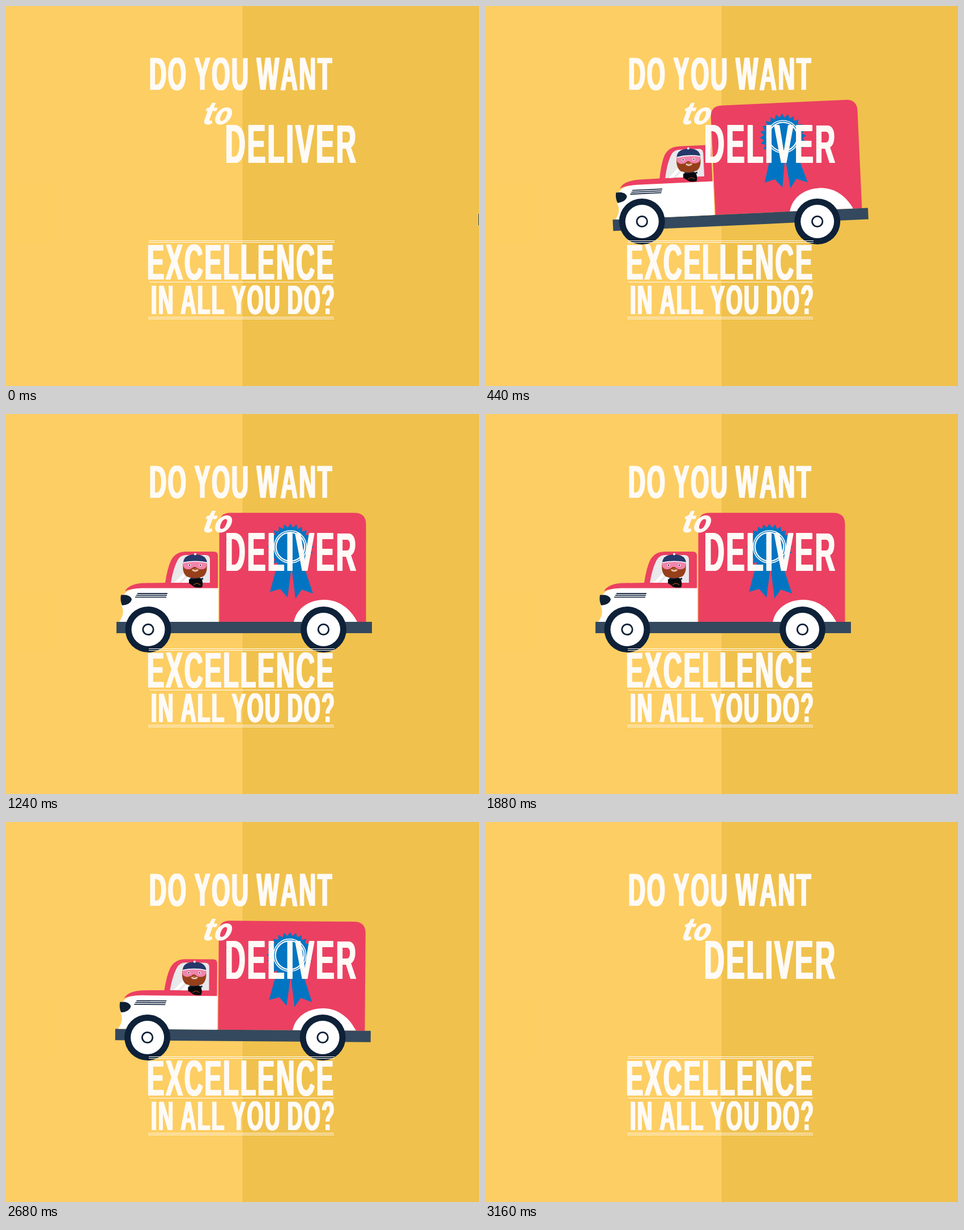
An HTML page for the animation above (3.2 s loop, 835 by 671 pixels).

```html
<!DOCTYPE html>
<html lang="en">
<head>
<meta charset="utf-8">
<title>Delivery truck</title>
<style>
  html, body { margin: 0; width: 100%; height: 100%; overflow: hidden; background: #fdce63; }
  svg { position: absolute; left: 0; top: 0; }
  /* Condensed headline face: every line shares one squeeze and tracking. */
  .line {
    position: absolute;
    left: var(--x);
    top: calc(var(--base) - .8465em);
    font: bold 1em/1 "Liberation Sans", Arial, sans-serif;
    font-size: var(--size);
    font-kerning: none;
    letter-spacing: .06em;
    word-spacing: -.05em;
    white-space: nowrap;
    color: #fefaf6;
    text-shadow: 1px 0, -1px 0, 2.2px 0, -2.2px 0;
    transform: scaleX(.513);
    transform-origin: 0 0;
  }
</style>
</head>
<body>
<svg width="835" height="671" viewBox="0 0 835 671">
  <defs>
    <g id="wheel">
      <circle r="40.5" fill="#0e2138"/>
      <circle r="29.5" fill="#fff"/>
      <circle r="9.2" fill="none" stroke="#0e2138" stroke-width="2.8"/>
    </g>
  </defs>
  <rect width="835" height="671" fill="#fdce63"/>
  <rect x="417.5" width="418" height="671" fill="#f0c14d"/>

  <g id="truck">
    <g id="body">
      <!-- cargo box and chassis -->
      <path d="M376.5 367V194Q376.5 174.5 396 174.5H615Q635.5 174.5 635.5 195V367Z" fill="#eb4062"/>
      <path d="M508 367C513 342 536 328 562 328C588 328 608 344 620 367Z" fill="#fff"/>
      <rect x="195" y="367" width="451" height="20" fill="#34495e"/>

      <!-- cab -->
      <path d="M375 307H240Q213 308 208 320L204 338Q211 351 200 367H375Z" fill="#fff"/>
      <path d="M210 313Q217 299 246 298.5L281 298Q285 272 291 259Q299 243 318 243H367Q374 243 374 250V307.5H240Q220 308 210 313Z" fill="#eb4062"/>
      <path d="M291 298Q295 274 302 260Q307 249 318 249H352Q360 249 360 257V298Z" fill="#e9e8ea"/>
      <path d="M297 298L314 281H321L305 298ZM310 298L322 286V298Z" fill="#fff"/>
      <path d="M232 317H285M230 320.2H284M228 323.4H283" stroke="#1b2b44" stroke-width="1.8"/>
      <path d="M203 319.5H212Q222 322 222 328Q219 337 205 338Q201 329 203 319.5Z" fill="#0f2033"/>

      <!-- driver -->
      <path d="M323 296Q325 286 334 286Q344 286 345 296Z" fill="#17264a"/>
      <path d="M323 292L345 290Q349 300 346 306Q333 308 328 302L323 299Z" fill="#08090d"/>
      <path d="M331 302Q337 296 343 302" fill="none" stroke="#8d3d17" stroke-width="1.2"/>
      <path d="M343 291L348 289V293Z" fill="#17264a"/>
      <path d="M313 261H354Q357 280 348 287Q334 293 319 287Q310 280 313 261Z" fill="#96401a"/>
      <path d="M313 263Q333 258 354 263Q356 273 347 274Q339 275 335 270H331Q327 275 319 274Q311 272 313 263Z" fill="#f284ad"/>
      <path d="M327 275Q334 270 341 275Q338 280 334 279Q330 280 327 275Z" fill="#b9643a"/>
      <path d="M329 275Q334 279 339 275" fill="none" stroke="#fff" stroke-width="1.5"/>
      <g fill="#fff"><circle cx="324" cy="267" r="2.3"/><circle cx="343" cy="267" r="2.3"/></g>
      <g fill="#24171d"><circle cx="324" cy="267" r="1.2"/><circle cx="343" cy="267" r="1.2"/></g>
      <path d="M313 262Q314 248 334 248Q353 248 355 262Q334 258 313 262Z" fill="#26386a"/>
      <path d="M313 262.5Q334 258 355 262.5" fill="none" stroke="#fff" stroke-width="1.6"/>
      <circle cx="334" cy="247.5" r="2" fill="#fff"/>

      <!-- rosette -->
      <g fill="#0175c2">
        <path d="M480 262L466 314L484 309L497 324L504 270L511 326L522 310L542 317L523 260Z"/>
        <path id="teeth"/>
      </g>
      <g fill="none" stroke="#fff" transform="translate(502 234.5)">
        <circle r="28.5" stroke-width="1.6"/>
        <circle r="25.3" stroke-width="2.2"/>
      </g>
    </g>
    <use href="#wheel" x="251" y="380.5"/>
    <use href="#wheel" x="560.5" y="380.5"/>
  </g>

  <!-- haze at the left edge -->
  <g fill="#fdce63" fill-opacity=".41">
    <rect y="303" width="84" height="119"/>
    <rect y="303" width="42" height="119"/>
  </g>

  <path d="M252 414.5H580M252 417.5H580M253 487.5H579M251 549.5H579M251 552.5H579" stroke="#fefaf6"/>
  <text transform="translate(345 209) skewX(-14)" fill="#fefaf6" font-family="Lato, sans-serif" font-size="57" font-weight="900" font-style="italic">to</text>
</svg>
<div class="line" style="--x:253px; --base:148px; --size:81.4px">DO YOU WANT</div>
<div class="line" style="--x:387px; --base:277px; --size:96px">DELIVER</div>
<div class="line" style="--x:249px; --base:483.5px; --size:88.3px">EXCELLENCE</div>
<div class="line" style="--x:255.5px; --base:545px; --size:72.7px">IN ALL YOU DO?</div>

<script>
const LOOP = 3200, STEP = 40;
const truck = document.getElementById('truck');
const body = document.getElementById('body');
const clamp = v => Math.max(0, Math.min(1, v));

function starPath(cx, cy, outer, inner, points) {
  const corners = Array.from({ length: points * 2 }, (_, i) => {
    const r = i % 2 ? inner : outer, a = Math.PI * i / points;
    return (cx + r * Math.sin(a)).toFixed(1) + ' ' + (cy - r * Math.cos(a)).toFixed(1);
  });
  return 'M' + corners.join('L') + 'Z';
}
document.getElementById('teeth').setAttribute('d', starPath(502, 234.5, 41, 34, 24));

// Brakes in from the right, waits, then speeds away to the left.
function offset(t) {
  const arrive = 639 * (1 - clamp(t / 800)) ** 4;
  const leave = 62 * (Math.max(0, t - 2646) / 154) ** 2.5;
  return arrive - leave;
}

// Nose dips while braking and lifts while accelerating.
function tilt(t) {
  const brake = Math.sin(Math.PI * clamp((t - 150) / 960)) ** 2;
  return 1.4 * clamp((t - 2600) / 250) - 4 * brake;
}

function draw(now) {
  const t = Math.floor(now % LOOP / STEP) * STEP;
  truck.setAttribute('transform', `translate(${offset(t)} 0)`);
  body.setAttribute('transform', `rotate(${tilt(t)} 420.5 280.5)`);
  requestAnimationFrame(draw);
}
draw(0);
</script>
</body>
</html>
```
